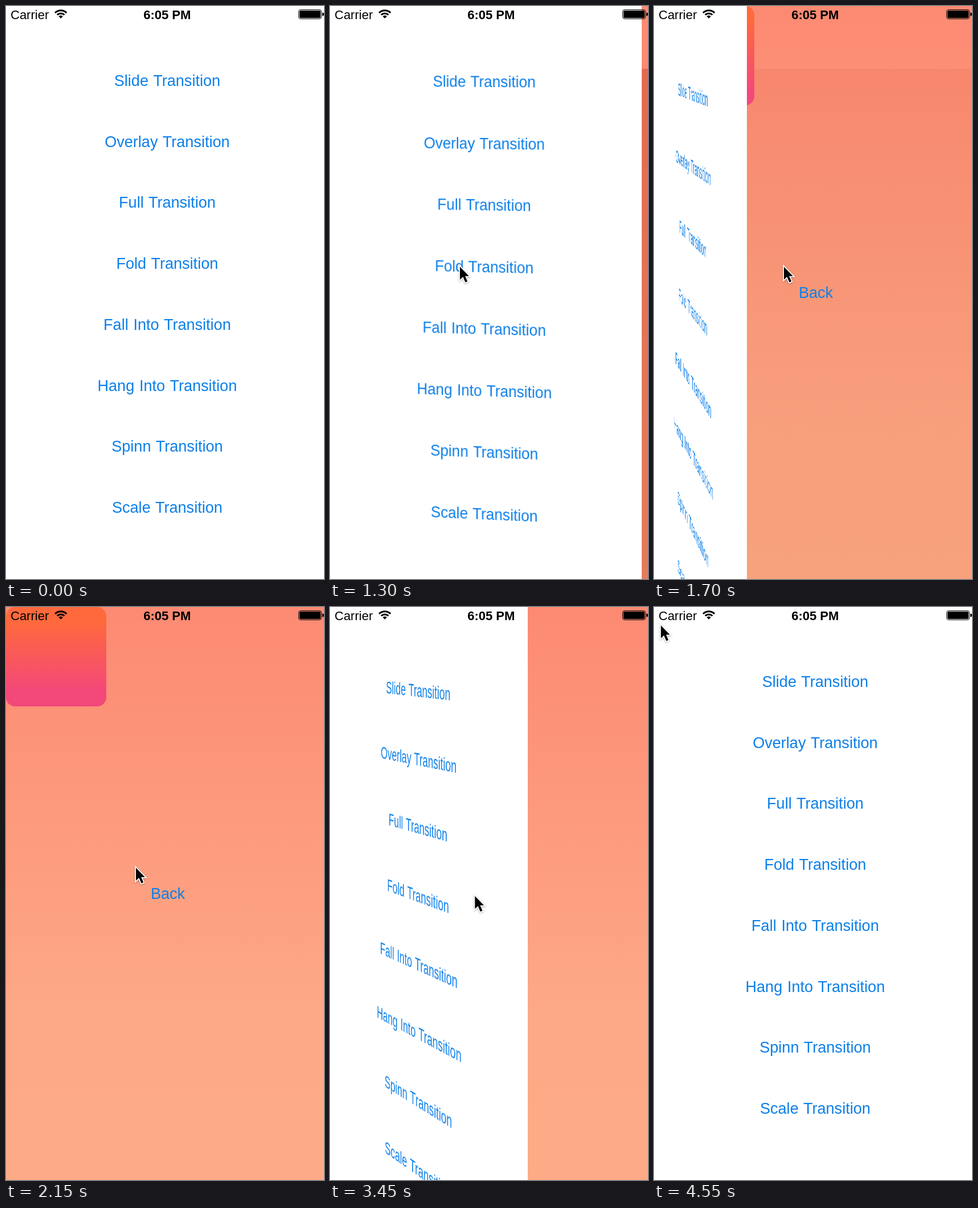
An HTML page that plays this animation: 558x1003 px, repeating every 4600 ms.

```html
<!DOCTYPE html>
<html lang="en">
<head>
<meta charset="utf-8">
<title>Fold transition</title>
<style>
  html, body { margin: 0; width: 100%; height: 100%; overflow: hidden; background: #fff; }
  body { position: relative; font-family: "Liberation Sans", Arial, sans-serif; }
  .view { position: absolute; left: 0; top: 0; width: 565px; height: 1003px; overflow: hidden; }
  #detail { background: #fc8a72; }
  #panel { background: linear-gradient(#fc8a72, #fda886 70%, #fdab87); }
  #shade { top: 110px; background: #c84628; }
  #tile { position: absolute; left: 0; top: 0; width: 176px; height: 174px; border-radius: 16px;
    background: linear-gradient(#ff693c 15%, #f3487a 85%); }
  #menu { background: #fff; transform-origin: 0 0; }
  .link { position: absolute; left: .4px; width: 565px; height: 30px; line-height: 30px;
    text-align: center; font-size: 27.05px; word-spacing: 1.3px; color: #0c7fe8; white-space: nowrap; }
  #over { position: absolute; left: 0; top: 0; }
</style>
</head>
<body>
<div id="detail" class="view">
  <div id="panel" class="view"></div>
  <div id="shade" class="view"></div>
  <div id="content" class="view">
    <div id="tile"></div>
    <div class="link" style="top:487px;left:1.6px">Back</div>
  </div>
</div>
<div id="menu" class="view"></div>
<svg id="over" width="558" height="1003" viewBox="0 0 558 1003">
  <g font-size="22">
    <text x="8" y="22.5">Carrier</text>
    <text x="282.8" y="22.5" text-anchor="middle" font-weight="bold">6:05 PM</text>
  </g>
  <g transform="translate(96.2 21.8)" fill="none" stroke="#000" stroke-width="3">
    <path d="M-10-9.8A14 14 0 0 1 10-9.8M-6.3-6.3A8.9 8.9 0 0 1 6.3-6.3"/>
    <path d="M0 0L-3.7-3.7A5.2 5.2 0 0 1 3.7-3.7Z" fill="#000" stroke="none"/>
  </g>
  <rect x="513.5" y="6.5" width="40" height="16" rx="3.5" fill="none" stroke="#000"/>
  <rect x="515" y="8" width="37" height="13" rx="2"/>
  <path d="M555 11.5a3 3 0 0 1 0 6z"/>
  <path id="cursor" d="M0 0V22.5L5.3 17.6L9.5 27.2L13.2 25.6L9.1 16.2H15.8Z" stroke="#fff"
    stroke-width="3.4" paint-order="stroke" style="filter:drop-shadow(0 1.5px 1.5px #0005)"/>
</svg>
<script>
  const LOOP = 4600;
  const $ = id => document.getElementById(id);
  const clamp = v => Math.min(1, Math.max(0, v));
  const ramp = (t, from, to) => clamp((t - from) / (to - from));

  const names = ['Slide', 'Overlay', 'Full', 'Fold', 'Fall Into', 'Hang Into', 'Spinn', 'Scale'];
  names.forEach((name, i) => {
    const link = document.createElement('div');
    link.className = 'link';
    link.textContent = name + ' Transition';
    link.style.top = 116 + 106.7 * i + 'px';
    $('menu').append(link);
  });

  // Pointer stops: time, x, y
  const stops = [
    [60, -24, 180], [700, 228, 456.5], [2250, 228, 456.5], [2700, 249.3, 506],
    [2900, 249.3, 506], [3150, 254.3, 506], [3860, 254.3, 506], [4560, 12, 32], [4600, 12, 32]
  ];

  function pointerAt(t) {
    const i = Math.max(1, stops.findIndex(s => s[0] > t));
    const [a, b] = [stops[i - 1], stops[i]];
    const k = ramp(t, a[0], b[0]);
    const e = k * k * (3 - 2 * k);
    return [1, 2].map(n => a[n] + (b[n] - a[n]) * e);
  }

  function draw(t) {
    // Fold around the left edge; the perspective deepens along with the angle
    const fold = ramp(t, 1169, 1779) - ramp(t, 3274, 3828);
    const angle = fold * Math.PI / 2;
    const depth = 6.4e-4 * fold * Math.sin(angle);
    const menu = $('menu').style;
    menu.visibility = fold > 0.999 ? 'hidden' : 'visible';
    menu.transform = fold > 0
      ? `matrix3d(${Math.cos(angle).toFixed(6)},0,0,${(-depth).toFixed(9)},0,1,0,0,0,0,1,0,0,0,0,1)`
      : 'none';

    // The new view sits low and dim until its layout settles
    $('panel').style.top = $('content').style.top = t < 1690 ? '114px' : '0';
    $('shade').style.opacity = 0.6 * (1 - ramp(t, 1169, 1810));

    $('cursor').setAttribute('transform', `translate(${pointerAt(t)})`);
  }

  const start = performance.now();
  function tick() {
    draw((performance.now() - start) % LOOP);
    requestAnimationFrame(tick);
  }
  tick();
</script>
</body>
</html>
```
